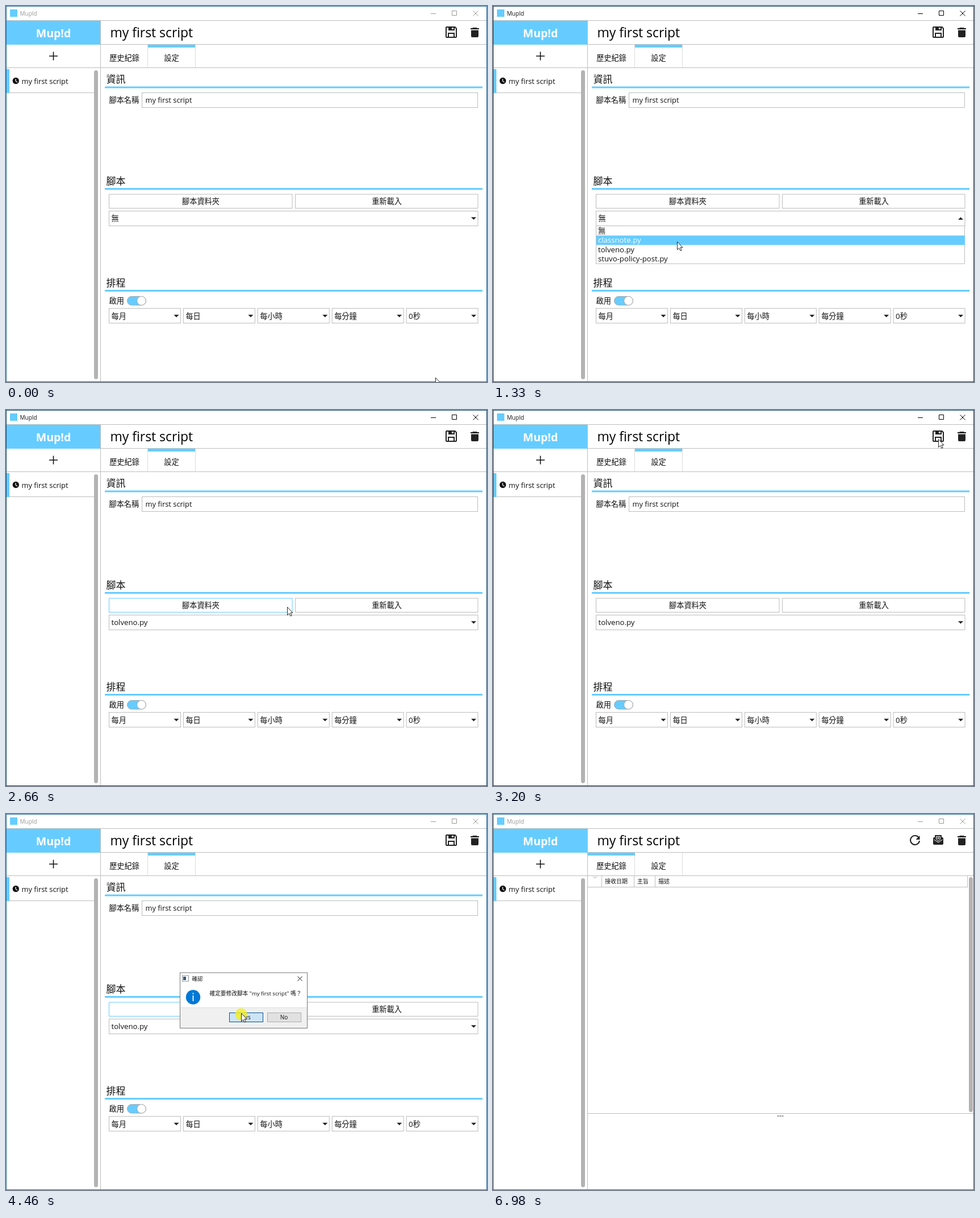
Recreate the animation shown at these times as an HTML page. Size 847x661 px, loop 7040 ms.

```html
<!DOCTYPE html>
<html lang="zh-Hant">
<head>
<meta charset="utf-8">
<title>Script settings</title>
<style>
html, body { margin: 0; width: 100%; height: 100%; overflow: hidden; background: #fff; }
svg { display: block; }
text { font-family: "Open Sans", "Noto Sans CJK TC", "Noto Sans CJK", sans-serif; font-size: 13.2px; fill: #111; }
.mid { text-anchor: middle; }
.sec { font-size: 17px; font-weight: 300; }
.small { font-size: 10px; }
.box { fill: #fff; stroke: #bcbcbc; }
.line { stroke: #bdbdbd; fill: none; }
.blue { fill: #66ccff; }
.ink { fill: #222; }
.thumb { fill: #b3b3b3; }
#frame { fill: none; stroke: #1c4a6b; }
#caption { font-size: 10px; }
#controls { fill: none; stroke: #000; }
.away #frame { stroke: #2d6da3; }
.away #caption { fill: #999; }
.away #controls { stroke: #999; }
</style>
</head>
<body>
<svg id="app" width="847" height="661" viewBox="0 0 847 661">
  <rect width="847" height="661" fill="#fff"/>

  <!-- title bar -->
  <rect class="blue" x="7" y="6" width="13" height="13"/>
  <text id="caption" x="24.5" y="16.5">MupId</text>
  <path id="controls" d="M748 13.5h9M785.5 8.500h8v8h-8zM822.500 8.500l9 9M831.500 8.500l-9 9"/>

  <!-- sidebar -->
  <path class="line" d="M1 25.500H847M167 67.500H847M1 108.500H847M166.500 26V661M6 152.500H155"/>
  <rect class="blue" x="1" y="26" width="165" height="42"/>
  <text class="mid" x="83.500" y="55" style="font-size:19.500px;font-weight:700;fill:#fff">Mup!d</text>
  <path d="M76 88h15M83.500 80.500v15" stroke="#111" stroke-width="1.600"/>
  <rect class="blue" x="1" y="111" width="5" height="42"/>
  <circle cx="17.300" cy="131.500" r="5.700" fill="#111"/>
  <path d="M17 128v4l3 2" fill="none" stroke="#fff" stroke-width="1.200"/>
  <text x="27.500" y="137" style="font-size:12.900px">my first script</text>
  <rect class="thumb" x="155" y="113" width="7" height="543" rx="3.500"/>

  <!-- header -->
  <text x="183.500" y="54.500" style="font-size:22.900px;font-weight:500;fill:#000">my first script</text>
  <path class="ink" d="M822 38h7l1 1h3v2h-15v-2h3zM819 42.500h13v10.500q0 2-2 2h-9q-2 0-2-2z"/>
  <path d="M249.500 68V108M333.500 68V108" stroke="#dcdcdc"/>
  <rect id="tab" class="blue" y="68" width="83" height="5"/>
  <text class="mid" x="208.500" y="96">歷史紀錄</text>
  <text class="mid" x="291.500" y="96">設定</text>

  <g id="settings">
    <path class="ink" fill-rule="evenodd" d="M776 36h15l3 3v15q0 2-2 2h-16q-2 0-2-2v-16q0-2 2-2zM776 38v16h2v-7h12v7h2v-14l-2-2v5h-11v-5zM780 49v5h8v-5zM785 38v3h3v-3z"/>
    <path d="M174 143H839M174 321.500H839M174 500.500H839" stroke="#66ccff" stroke-width="3"/>
    <text class="sec" x="176.500" y="135">資訊</text>
    <text class="sec" x="176.500" y="313.500">腳本</text>
    <text class="sec" x="176.500" y="492.500">排程</text>
    <text x="181.500" y="170">腳本名稱</text>
    <rect class="box" x="239.500" y="152.500" width="591" height="26"/>
    <text x="245.500" y="170" style="font-size:12.900px">my first script</text>
    <rect id="folder" class="box" x="181.500" y="331" width="322.500" height="24.500"/>
    <text class="mid" x="343" y="347.700">腳本資料夾</text>
    <rect id="reload" class="box" x="509.500" y="331" width="321.500" height="24.500"/>
    <text class="mid" x="670.500" y="347.700">重新載入</text>
    <rect class="box" x="181.500" y="360.500" width="649.500" height="26"/>
    <text id="choice" x="185.500" y="378.300"></text>
    <path id="arrow" class="ink"/>
    <text x="181.500" y="523">啟用</text>
    <rect class="blue" x="213.500" y="510.500" width="33" height="15.500" rx="7.750" stroke="#aaa"/>
    <circle cx="238.500" cy="518.200" r="7.800" fill="#fff" stroke="#aaa"/>
    <g id="combos"></g>
    <g id="list">
      <rect class="box" x="181.500" y="386.500" width="649" height="66.500"/>
      <rect id="bar" class="blue" x="182" width="649" height="16.600"/>
      <g id="items"></g>
    </g>
  </g>

  <g id="history">
    <path d="M750 42a8 8 0 1 0 1 5" fill="none" stroke="#222" stroke-width="2"/>
    <path class="ink" d="M751.500 38v7h-7z"/>
    <path class="ink" d="M779 37h10q1 0 1 1v3h1q2 0 2 2v9q0 2-2 2h-14q-2 0-2-2v-9q0-2 2-2h1v-3q0-1 1-1z"/>
    <path d="M780.500 39.500h7v5l-3.500 3-3.500-3zM776.500 45l7.500 5 7.500-5" fill="none" stroke="#fff"/>
    <path d="M782 41.500h4M782 43.500h4" stroke="#fff"/>
    <path class="line" d="M167 128.500H836M191.500 109V128M248.500 109V128M285.500 109V128M835.500 109V128M167 526.500H847"/>
    <path d="M176.500 110l3 2.500 3-2.500" fill="none" stroke="#999"/>
    <text class="small" x="197" y="122.300">接收日期</text>
    <text class="small" x="254" y="122.300">主旨</text>
    <text class="small" x="291" y="122.300">描述</text>
    <rect class="thumb" x="838" y="111" width="7" height="413" rx="3.500"/>
    <g fill="#b0b0b0"><circle cx="502" cy="531" r="1.800"/><circle cx="506" cy="531" r="1.800"/><circle cx="510" cy="531" r="1.800"/></g>
  </g>

  <g id="dialog">
    <rect x="306.500" y="279" width="224" height="97.500" fill="#fff" stroke="#777"/>
    <rect x="307" y="341" width="223" height="35" fill="#f0f0f0"/>
    <path d="M307 340.500h223" stroke="#dfdfdf"/>
    <rect x="310.500" y="284" width="11" height="10" fill="#fff" stroke="#8a949c"/>
    <rect x="312" y="286" width="5" height="6" fill="#3c5a78"/>
    <text x="327.500" y="292.500" style="font-size:9.500px">確認</text>
    <path d="M513.500 285.500l8 8M521.500 285.500l-8 8" stroke="#111"/>
    <circle cx="329.500" cy="322" r="12.700" fill="#0078d7"/>
    <path d="M329.500 314.500v2.200M329.500 319v10" stroke="#fff" stroke-width="1.800"/>
    <text x="358.500" y="319" style="font-size:9.700px">確定要修改腳本 "my first script" 嗎？</text>
    <rect id="yes" x="393.500" y="349.500" width="59" height="16"/>
    <text class="mid small" x="423" y="361">Yes</text>
    <rect x="460.500" y="349.500" width="59" height="16" fill="#e1e1e1" stroke="#adadad"/>
    <text class="mid small" x="489.500" y="361">No</text>
  </g>

  <rect id="frame" x=".5" y=".5" width="846" height="660"/>
  <g id="mouse">
    <circle id="press" cx="0" cy="2" r="10.500" fill="#f3ee25" fill-opacity=".82"/>
    <path d="M.5 .5V14.500L3.700 11.500L6 16.300L8.200 15.300L6 10.600H10Z" fill="#fff" stroke="#111" stroke-width=".9"/>
  </g>
</svg>
<script>
const LOOP = 7040;
const $ = id => document.getElementById(id);
const show = (id, on) => $(id).style.display = on ? "" : "none";
const within = (t, a, b) => t >= a && t < b;
const triangle = (x, y, up) => up
  ? `M${x - 4.5} ${y + 2.3}h9l-4.500 -4.600z`
  : `M${x - 4.5} ${y - 2.3}h9l-4.500 4.600z`;

const files = ["無", "classnote.py", "tolveno.py", "stuvo-policy-post.py"];
const rowTop = 387, rowStep = 16.5;

$("items").innerHTML = files.map((name, i) =>
  `<text x="185" y="${399.5 + i * rowStep}">${name}</text>`).join("");
$("combos").innerHTML = ["每月", "每日", "每小時", "每分鐘", "0秒"].map((name, i) => {
  const x = 181.5 + i * 130.9;
  return `<rect class="box" x="${x}" y="531.500" width="126" height="26"/>
    <text x="${x + 4}" y="549.500">${name}</text>
    <path class="ink" d="${triangle(x + 118.5, 545)}"/>`;
}).join("");

// Pointer moves: start, end, evenly timed stops
const moves = [
  [0, 0, [[756, 653]]],
  [70, 620, [[746, 640], [710, 600], [640, 535], [550, 470], [455, 415], [375, 384], [330, 375], [330, 375]]],
  [940, 1570, [[330, 377], [329, 383], [327, 391], [326, 399], [325, 407], [324, 414], [326, 420], [330, 426], [334, 430]]],
  [2420, 3120, [[350, 424], [395, 400], [445, 372], [495, 346], [542, 334], [600, 290], [662, 222], [718, 152], [756, 95], [776, 60]]],
  [3200, 3200, [[784, 51]]],
  [3780, 3990, [[690, 130], [530, 255], [430, 338], [413, 349]]],
  [4240, 4240, [[414, 350]]],
  [5570, 6270, [[415, 354], [410, 366], [396, 388], [378, 412], [364, 440], [360, 468], [392, 492], [470, 512], [575, 532], [675, 550]]]
];
const stops = moves.flatMap(([a, b, pts]) => pts.map(([x, y], i) => {
  const gap = pts.length > 1 ? (b - a) / (pts.length - 1) : 0;
  return { t: Math.floor((a + i * gap) / 10) * 10, x, y };
}));
const presses = [[540, 620], [2180, 2260], [3300, 3450], [4460, 4560]];

function hover(id, p, left, right) {
  const on = p.x >= left && p.x <= right && p.y >= 331 && p.y <= 356;
  $(id).style.stroke = on ? "#66ccff" : "";
}

function draw(t) {
  const p = stops.filter(s => s.t <= t).pop();
  const done = t >= 4560;
  const asking = within(t, 3450, 4560);
  const open = within(t, 620, 2260);
  const pressed = presses.some(([a, b]) => within(t, a, b));

  $("app").classList.toggle("away", t < 540 || asking || t >= 6980);
  show("settings", !done);
  show("history", done);
  show("dialog", asking);
  show("list", open);
  show("mouse", t < 6350);
  show("press", pressed);
  $("mouse").setAttribute("transform", `translate(${p.x} ${p.y})`);
  $("tab").setAttribute("x", done ? 167 : 250);
  $("choice").textContent = files[t < 2260 ? 0 : 2];
  $("arrow").setAttribute("d", triangle(823.5, 373.5, open));

  const row = Math.max(0, Math.floor((p.y - rowTop) / rowStep));
  $("bar").setAttribute("y", rowTop + row * rowStep);
  [...$("items").children].forEach((el, i) => el.style.fill = i === row ? "#fff" : "");

  hover("folder", p, 181, 504);
  hover("reload", p, 509, 831);

  const over = t >= 3990;
  const yes = $("yes").style;
  yes.fill = pressed && over ? "#cce4f7" : over ? "#e5f1fb" : "#e1e1e1";
  yes.stroke = pressed && over ? "#005499" : "#0078d7";
  yes.strokeWidth = over ? 1 : 2;
}

const start = performance.now();
function tick() {
  draw((performance.now() - start) % LOOP);
  requestAnimationFrame(tick);
}
draw(0);
requestAnimationFrame(tick);
</script>
</body>
</html>
```
